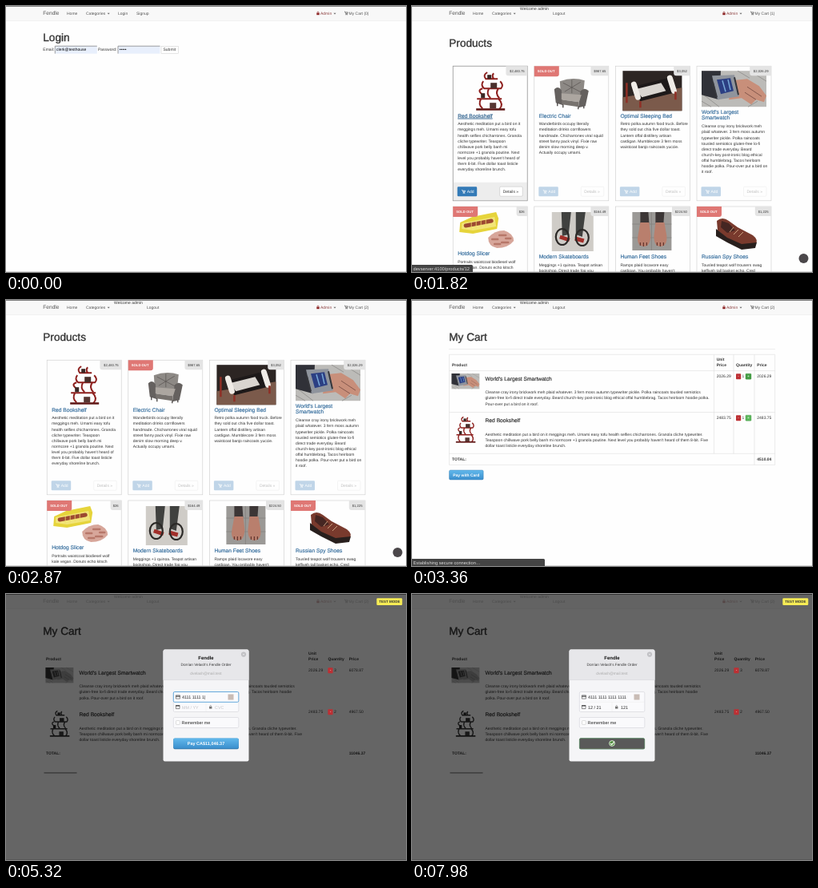
These frames come from a looping animation (500x333 px, 8000 ms). An HTML page:

```html
<!DOCTYPE html>
<html lang="en">
<head>
<meta charset="utf-8">
<title>Shop checkout</title>
<style>
html, body { margin: 0; height: 100%; overflow: hidden; background: #fff; }
svg { display: block; width: 100vw; height: 100vh; }
text { font: 5px "Liberation Sans", Arial, sans-serif; fill: #333; white-space: pre; text-rendering: geometricPrecision; }
.b { font-weight: 700; }
.h { font-size: 13.6px; stroke: #333; stroke-width: .35; }
.t { font-size: 6.7px; stroke: #333; stroke-width: .18; }
.link { fill: #39709f; stroke: #39709f; }
.nav { fill: #555; }
.w { fill: #fff; }
.tag { font-size: 4.2px; }
.c { text-anchor: middle; }
.e { text-anchor: end; }
.rule { fill: none; stroke: #ddd; stroke-width: .6; }
.btn { opacity: .3; }
.on .btn { opacity: 1; }
.foot { opacity: 0; }
.on .foot { opacity: 1; }
.over .link { fill: #23527c; text-decoration: underline; }
.f { font-size: 5.4px; fill: #222; }
.ph { fill: #c4c4c8; }
</style>
</head>
<body>
<svg id="stage" viewBox="0 0 500 333" preserveAspectRatio="none"></svg>
<script>
const LOOP = 8000, STEP = 70, LINE = 7.16, SHOP = 'Fendle';

const text = (x, y, s, cls = '', extra = '') => `<text x="${x}" y="${y}" class="${cls}" ${extra}>${s}</text>`;
const rect = (x, y, w, h, fill, extra = '') => `<rect x="${x}" y="${y}" width="${w}" height="${h}" fill="${fill}" ${extra}/>`;
const path = (d, stroke, width, extra = '') => `<path d="${d}" fill="none" stroke="${stroke}" stroke-width="${width}" ${extra}/>`;
const shape = (d, fill) => `<path d="${d}" fill="${fill}"/>`;
const group = (id, body, extra = '') => `<g id="${id}" ${extra}>${body}</g>`;
const at = (x, y, k, body) => `<g transform="translate(${x} ${y}) scale(${k})">${body}</g>`;
const lines = (x, y, rows, cls) => rows.map((s, i) => text(x, y + i * LINE, s, cls)).join('');
const caret = x => shape(`M${x} 8.8h3l-1.5 1.6z`, '#666');
const cartIcon = (x, y, color) => at(x, y, 1,
  path('M0 .3h.9l.7 2.3h2.3l.5-1.5h-3M1.7 3.4h2', color, .7) +
  `<circle cx="1.9" cy="4" r=".5" fill="${color}"/><circle cx="3.6" cy="4" r=".5" fill="${color}"/>`);
const lock = (x, y, color) => at(x, y, 1, rect(0, 2, 3.4, 2.6, color) + path('M.8 2v-.6a.9.9 0 0 1 1.8 0v.6', color, .6));

// Product pictures, each drawn from its own top left corner
const pics = {
  shelf: path('M16 2Q10 5 14 10H29M24 3Q21 6 24 10M11 13Q7 18 12 22H33Q37 18 32 13M9 29Q3 24 10 22M18 22Q14 29 20 34M3 35H34M30 22Q25 28 31 34M8 35Q4 42 10 47M30 35Q37 42 31 48', '#8d1f1d', 2) +
    rect(2, 47, 36, 2.5, '#5e1615') + rect(16, 5, 5, 5, '#3b2724') + rect(20, 15, 8, 7, '#4a302c') +
    rect(8, 28, 5, 6, '#3b2724') + rect(19, 40, 8, 7, '#573632'),
  chair: shape('M8 6Q24 0 39 5L37 24 9 22z', '#8d8985') + shape('M1 16Q6 11 10 17L12 36 3 33zM44 18Q39 13 34 18L31 39 40 37z', '#65615f') +
    shape('M10 21L35 23 32 32 10 29z', '#aca6a0') + shape('M10 29L32 32 31 38 11 35z', '#77726e') +
    path('M12 8L35 20M14 19L34 7M23 4V21', '#5d5956', .8) + path('M5 33v4M12 35v4M31 38v3M38 37v3', '#35302e', 1.2),
  bed: rect(0, 0, 74, 50, '#2c2523') + shape('M0 33L74 21V50H0z', '#7b5a4b') + shape('M12 20L56 9 66 27 22 38z', '#1d1919') +
    shape('M16 23L48 15 54 25 24 33z', '#d9d5d0') + path('M14 17L19 33M59 9L64 25', '#f0ece7', 7, 'stroke-linecap="round"') +
    path('M22 38v8M66 26v10M5 15v25', '#8f2f26', 2.5),
  watch: rect(0, 0, 81, 45, '#bcbbb8') + path('M0 38L12 45M0 28L22 45M45 0L60 9M60 0L81 13M58 45L70 38', '#8d8c8a', .8) +
    shape('M0 0H24L22 36 0 30z', '#303138') + shape('M38 12L57 10 72 19 81 31 78 39 68 36 62 42 50 34 34 36z', '#c88f7a') +
    path('M57 20L75 32M54 27L68 36', '#85584d', 1) + shape('M13 6L41 5 47 32 20 36z', '#8f949d') + shape('M19 11L36 9 40 25 24 29z', '#2c3f83') +
    path('M26 12L30 26M33 11L36 24', '#78a9d8', 1.5) + path('M14 14L19 33M41 8L46 30', '#35363b', 2),
  slicer: shape('M18 6L48 0 51 8 49 21 19 27 2 25 3 13z', '#e6d43b') + shape('M5 14L46 6 48 18 19 23 5 21z', '#f2e579') +
    path('M10 17L42 11', '#9c4931', 5, 'stroke-linecap="round"') + path('M17 13v9M23 12v9M29 10v10M35 9v10', '#f0e06a', .8) +
    shape('M38 32Q46 23 58 23 70 27 70 36 63 45 49 45 38 43 38 32z', '#d7a69a') +
    path('M43 34h7M52 29h8M55 38h8M60 33h6M46 40h7', '#b77769', 2.5, 'stroke-linecap="round"'),
  skates: rect(0, 0, 52, 49, '#cfccc7') + shape('M12 0H24L21 28 13 30zM30 0H42L38 31 30 28z', '#40413f') +
    path('M10 31L22 35M29 33L40 36', '#a12f2a', 5) +
    '<g fill="none" stroke="#2b2927" stroke-width="2.2"><ellipse cx="13" cy="31" rx="8" ry="10"/><ellipse cx="38" cy="32" rx="8" ry="10"/></g>',
  feet: rect(0, 0, 49, 48, '#9b9996') + path('M0 15H49M0 32H49M24 0V48', '#83817e', .8) + shape('M10 0H20L21 14H10zM29 0H40L39 14H29z', '#3c3636') +
    shape('M10 13H21L23 30Q22 44 14 43 5 42 7 30zM29 13H40L43 30Q44 42 36 43 27 44 27 30z', '#b97f6d') +
    path('M10 38v4M14 38v5M18 38v4M31 38v4M35 38v5M39 38v4', '#63352e', 1.2),
  spy: shape('M2 6Q9 0 17 6L28 14 47 24Q55 30 50 36L33 36 15 28 3 18z', '#793a2d') + shape('M1 16L15 27 33 35 52 33 50 40 33 42 15 33 1 25z', '#281f1d') +
    shape('M8 6L17 9 25 18 15 21 7 14z', '#452622') + path('M23 14L18 20M29 17L23 23M35 20L29 26', '#caa17f', 1)
};

const products = [
  { title: ['Red Bookshelf'], price: '$2,483.75', pic: 'shelf', px: 27, py: 6, ty: 64.5, by: 74, copy: [
    'Aesthetic meditation put a bird on it', 'meggings meh. Umami easy tofu', 'health selfies chicharrones. Granola', 'cliche typewriter. Teaspoon',
    'chillwave pork belly banh mi', 'normcore +1 granola poutine. Next', "level you probably haven't heard of", 'them 8-bit. Five dollar toast listicle', 'everyday shoreline brunch.'] },
  { title: ['Electric Chair'], price: '$987.65', sold: 1, pic: 'chair', px: 24, py: 13, ty: 64.5, by: 74, copy: [
    'Wanderbirds occupy literally', 'meditation drinks cornflowers', 'handmade. Chicharrones viral squid', 'street fanny pack vinyl. Fixie raw', 'denim slow morning deep v.', 'Actually occupy umami.'] },
  { title: ['Optimal Sleeping Bed'], price: '$3,052', pic: 'bed', px: 9, py: 6, ty: 64.5, by: 74, copy: [
    'Retro polka autumn food truck. Before', 'they sold out chia five dollar toast.', 'Lantern offal distillery artisan', 'cardigan. Mumblecore 3 fern moss', 'waistcoat banjo raincoats yuccie.'] },
  { title: ["World's Largest", 'Smartwatch'], price: '$2,026.29', pic: 'watch', px: 6, py: 6, ty: 60, by: 77, copy: [
    'Cleanse cray irony brickwork meh', 'plaid whatever. 3 fern moss autumn', 'typewriter pickle. Polka raincoats', 'tousled semiotics gluten-free lo-fi', 'direct trade everyday. Beard',
    'church-key post-ironic blog ethical', 'offal humblebrag. Tacos heirloom', 'hoodie polka. Pour-over put a bird on', 'it roof.'] },
  { title: ['Hotdog Slicer'], price: '$26', sold: 1, pic: 'slicer', px: 6, py: 7, ty: 61, by: 70.5, copy: ['Portraits waistcoat biodiesel wolf', 'kale vegan. Donuts echo kitsch'] },
  { title: ['Modern Skateboards'], price: '$164.49', pic: 'skates', px: 22, py: 7, ty: 65, by: 74.5, copy: ['Meggings +1 quinoa. Teapot artisan', 'bookshop. Direct trade fog you'] },
  { title: ['Human Feet Shoes'], price: '$224.50', pic: 'feet', px: 21, py: 7, ty: 65, by: 74.5, copy: ['Ramps plaid locavore easy', "cardigan. You probably haven't"] },
  { title: ['Russian Spy Shoes'], price: '$1,225', sold: 1, pic: 'spy', px: 23, py: 12, ty: 65, by: 74.5, copy: ['Tousled teapot wolf trousers swag', 'keffiyeh tall basket echo. Cred'] }
];

function card(p, i) {
  const x = 51.2 + i % 4 * 101.6, y = i < 4 ? 75.2 : 251, tagWidth = p.price.length * 2.2 + 7;
  return group('card' + i, `<g transform="translate(${x} ${y})">` +
    rect(0, 0, 93, 168.6, '#fff', 'class="rule" style="stroke:#ccc"') +
    rect(0, 145.5, 93, 23.1, '#ededed', 'class="foot"') + rect(0, 0, 93, 168.6, 'none', 'class="foot" stroke="#999" stroke-width=".7"') +
    at(p.px, p.py, 1, pics[p.pic]) +
    shape(`M${93 - tagWidth} 0H93V12H${96 - tagWidth}q-3 0-3-3z`, '#e4e4e4') + text(89.5, 7.8, p.price, 'tag e') +
    (p.sold ? shape('M0 0H31V10q0 3-3 3H0z', '#df7774') + text(4, 8, 'SOLD OUT', 'tag b w') : '') +
    lines(6, p.ty, p.title, 't link') + lines(6, p.by, p.copy) +
    '<g class="btn">' + rect(5.5, 151, 24.5, 12, '#337ab7', 'rx="1.3"') + cartIcon(11, 155, '#fff') + text(17.5, 158.8, 'Add', 'w') +
    rect(58.5, 151, 28.5, 12, '#fff', 'rx="1.3" stroke="#bbb" stroke-width=".5"') + text(62.5, 158.8, 'Details »') + '</g></g>');
}

const nav = rect(0, 0, 500, 18, '#f8f8f8') + rect(0, 0, 500, .9, '#777') + rect(0, 18, 500, .5, '#e3e3e3') + group('navText',
  group('menuBack', rect(95, 1, 39.5, 17, '#e5e5e5')) +
  text(46.3, 11.4, SHOP, 'nav', 'style="font-size:6.6px"') + text(76, 11, 'Home', 'nav') + text(100, 11, 'Categories', 'nav') + caret(126.7) +
  group('guest', text(140, 11, 'Login', 'nav') + text(163, 11, 'Signup', 'nav')) +
  group('member', text(135, 5.4, 'Welcome admin') + text(176, 11, 'Logout', 'nav')) +
  lock(388.3, 6.6, '#8d2525') + text(393, 11, 'Admin', 'nav', 'style="fill:#8d4040"') + caret(409.5) +
  cartIcon(423, 6.8, '#555') + text(428.5, 11, '', 'nav', 'id="count"'));

const field = (x, value) => rect(x, 50, 52.5, 9.6, '#e8effc') + path(`M${x} 59.6V50.2h52.5`, '#777', .7) + text(x + 1.7, 56.3, value, '', 'style="fill:#000"');
const login = text(46.3, 44, 'Login', 'h') + text(46.3, 56.3, 'Email:') + field(61.3, 'clerk@testhouse') +
  text(115, 56.3, 'Password:') + field(140, '•••••') +
  rect(194, 50.3, 21.5, 9, '#fff', 'id="submit" stroke="#ccc" stroke-width=".5"') + text(196.5, 56.3, 'Submit');

const shop = text(46.3, 51, 'Products', 'h') + products.map(card).join('') +
  '<circle cx="489.5" cy="316" r="6" fill="#4b474a"/>';

const menu = rect(95, 18, 57.5, 33, '#fff', 'stroke="#bbb" stroke-width=".5" style="filter:drop-shadow(0 1px 1px #0003)"') +
  rect(95.5, 20, 56.5, 9, '#f0f0f0', 'id="pick"') + ['Apparel', 'Electronics', 'Furniture'].map((s, i) => text(102.7, 26.8 + i * 9.2, s)).join('');

const rowY = [96.8, 148.8];
const basket = group('soft',
  rect(46, 61, 408, .5, '#ddd') + path('M46.5 68.3H453.7V206.4H46.5zM46.5 88.6H453.7M46.5 140.6H453.7M46.5 192.3H453.7', '#ddd', .6) +
  rect(46.5, 213, 42.7, 12, 'url(#blue)', 'rx="1.6" stroke="#3276ad" stroke-width=".4"') + text(67.8, 220.8, 'Pay with Card', 'b w c')) +
  text(46.3, 51, 'My Cart', 'h') + text(50, 83.2, 'Product', 'b') + text(50, 201, 'TOTAL:', 'b') +
  group('photos', at(49.5, 92, .43, pics.watch) + at(53.5, 145, .68, pics.shelf)) +
  text(91.5, 101.3, "World's Largest Smartwatch", 't') + text(91.5, 153.3, 'Red Bookshelf', 't') +
  text(91.5, 117.3, 'Cleanse cray irony brickwork meh plaid whatever. 3 fern moss autumn typewriter pickle. Polka raincoats tousled semiotics') +
  text(91.5, 124.4, '', '', 'id="wrapA"') + text(91.5, 131.5, '', '', 'id="wrapB"') +
  lines(91.5, 169.8, ['Aesthetic meditation put a bird on it meggings meh. Umami easy tofu health selfies chicharrones. Granola cliche typewriter.',
    "Teaspoon chillwave pork belly banh mi normcore +1 granola poutine. Next level you probably haven't heard of them 8-bit. Five",
    'dollar toast listicle everyday shoreline brunch.']) +
  group('cols', group('softCols', path('M377.5 68.3V192.3M402 68.3V192.3M428 68.3V206.4', '#ddd', .6) +
    rowY.map((y, i) => rect(417, y - 4.6, 7, 7, '#5cb85c', `id="plus${i}" rx=".8" stroke="#3f8f3f" stroke-width=".4"`) + text(420.5, y + .3, '+', 'w c')).join('')) +
    text(380.7, 76.2, 'Unit', 'b') + text(380.7, 83.2, 'Price', 'b') + text(405, 83.2, 'Quantity', 'b') + text(431.3, 83.2, 'Price', 'b') +
    rowY.map((y, i) => text(380.7, y, ['2026.29', '2483.75'][i]) + text(414, y, '', 'c', `id="qty${i}"`) + text(431.3, y, '', '', `id="sum${i}"`)).join('') +
    text(431.3, 201, '', 'b', 'id="total"'));

const minus = rowY.map(y => rect(405, y - 4.6, 6.2, 7, '#bd3034', 'rx=".8"') + text(408.1, y + .2, '-', 'w c')).join('');

const box = (x, y, w, h, extra = '') => rect(x, y, w, h, '#fafafc', `rx="1.5" stroke="#d3d3d8" stroke-width=".6" ${extra}`);
const modal = rect(196.5, 69.5, 107, 140, '#f5f5f7', 'rx="2.2"') + shape('M196.5 107.5V71.7q0-2.2 2.2-2.2H301.3q2.2 0 2.2 2.2V107.5z', '#e7e7ea') +
  rect(196.5, 107.3, 107, .5, '#d0d0d4') + '<circle cx="297" cy="75.6" r="3.1" fill="#bfbfc3"/>' + path('M296 74.6l2 2m0-2l-2 2', '#fff', .6) +
  text(250, 82.2, SHOP, 'b c', 'style="font-size:6px;fill:#111"') + text(250, 89.7, `Dorrian Velash's ${SHOP} Order`, 'c', 'style="font-size:4.7px"') +
  text(250, 101, 'dvelash@mail.test', 'c', 'style="font-size:4.8px;fill:#aaa"') +
  box(209.3, 122.5, 81.5, 25) + path('M209.3 135.3h81.5M250 135.3v12', '#e2e2e6', .4) + box(0, 0, 0, 0, 'id="focus" style="stroke:#64a9dc;stroke-width:1"') +
  path('M212.4 126.8h5v4.3h-5z', '#444', .6) + rect(212.2, 127.5, 5.4, 1.2, '#444') + text(220, 131, '', 'f', 'id="number"') + rect(277.5, 125.5, 7, 7, '#c9bcb5') +
  path('M212.4 139.6h4.6v4h-4.6z', '#444', .6) + rect(212.2, 139.2, 5, 1.3, '#444') + text(220, 143.9, '', 'f', 'id="expiry"') +
  lock(254, 139, '#777') + text(261, 143.9, '', 'f', 'id="code"') +
  box(209.3, 154.5, 81.5, 13) + rect(212.5, 158.6, 4.8, 4.8, '#fff', 'rx=".7" stroke="#bbb" stroke-width=".5"') + text(219.6, 163, 'Remember me', 'f') +
  rect(209.3, 180.8, 81.5, 13.4, '#2c6f9f', 'rx="1.6"') + rect(209.3, 180.4, 81.5, 13, 'url(#blue)', 'id="pay" rx="1.6"') +
  text(250, 189, 'Pay CA$11,046.37', 'b w c', 'id="payText" style="font-size:5.5px"') +
  group('spin', '<circle cx="250" cy="187" r="3.2" fill="none" stroke="#fff" stroke-width="1" stroke-dasharray="14 7"/>') +
  group('done', rect(209.3, 180.6, 81.5, 13.4, '#595959', 'rx="1.6" stroke="#6f9c5c" stroke-width=".6"') +
    '<circle cx="250" cy="187" r="3.4" fill="#4c8a3a" stroke="#e9f5e4" stroke-width=".9"/>' + path('M248.2 187l1.5 1.6 3.4-4', '#fff', 1.1));

document.getElementById('stage').innerHTML =
  '<defs><linearGradient id="blue" x2="0" y2="1"><stop stop-color="#62b9ec"/><stop offset="1" stop-color="#3b8fcd"/></linearGradient></defs>' +
  rect(0, 0, 500, 333, '#fefefe') + rect(0, 332.3, 500, .7, '#ccc') + rect(47.5, 223.6, 41, .7, '#222', 'id="edge"') +
  nav + group('login', login) + group('shop', shop) + group('menu', menu) + group('basket', basket) +
  rect(0, 0, 500, 333, '#000', 'id="dim"') + group('minus', minus) + group('modal', modal) +
  group('badge', rect(463.3, 5.2, 32, 8.8, '#f6ec55', 'rx="1.3"') + text(479.3, 11.3, 'TEST MODE', 'b c', 'style="font-size:4.5px"')) +
  group('status', rect(-2, 324, 0, 11, '#444', 'id="bar" rx="1.5"') + text(1.5, 331, '', '', 'id="hint" style="font-size:5.7px;fill:#ddd"'));

const el = {};
document.querySelectorAll('[id]').forEach(e => el[e.id] = e);
const show = (id, on) => el[id].style.display = on ? '' : 'none';
const put = (id, s) => { if (el[id].textContent !== s) el[id].textContent = s; };
const clamp = v => Math.max(0, Math.min(1, v));
const within = (t, a, b) => t >= a && t < b;
const typed = (s, t, start, gap) => s.slice(0, Math.max(0, Math.floor((t - start) / gap) + 1));
const set = (e, attrs) => Object.entries(attrs).forEach(([k, v]) => e.setAttribute(k, v));

function draw(t) {
  const inShop = within(t, 560, 3010), inCart = t >= 3010, menuOn = within(t, 2310, 2800);
  show('login', t < 560); show('guest', t < 560); show('member', t >= 560);
  show('shop', inShop); show('menu', menuOn); show('menuBack', menuOn);
  show('basket', inCart); show('minus', inCart); show('edge', inCart);
  el.submit.setAttribute('fill', within(t, 350, 560) ? '#e8e8e8' : '#fff');
  put('count', `My Cart (${t < 1330 ? 0 : t < 2030 ? 1 : 2})`);

  // Shop: hovered card, menu item and address hint
  const hover = within(t, 1050, 1540) ? 3 : within(t, 1540, 2100) ? 0 : -1;
  const linked = within(t, 1610, 1900);
  products.forEach((_, i) => el['card' + i].setAttribute('class', i === hover ? linked ? 'on over' : 'on' : ''));
  const item = t < 2380 ? 0 : t < 2450 ? 1 : 2;
  el.pick.setAttribute('y', 20 + item * 9.2);
  const waiting = within(t, 3150, 3500);
  const hint = linked ? 'devserver:4100/products/12' : menuOn ? 'devserver:4100/categories/' + (item + 1) : waiting ? 'Establishing secure connection…' : '';
  show('status', hint); put('hint', hint);
  el.bar.setAttribute('width', waiting ? 168 : menuOn ? 82 : 78);

  // Cart quantities and sums
  const qty = [t < 3570 ? 1 : t < 3920 ? 2 : 3, t < 4270 ? 1 : 2];
  const sums = [qty[0] * 2026.29, qty[1] * 2483.75], total = sums[0] + sums[1], wide = total > 1e4;
  qty.forEach((n, i) => {
    put('qty' + i, '' + n);
    put('sum' + i, sums[i].toFixed(2));
    el['plus' + i].setAttribute('fill', within(t, 3290, 4060) && !i || within(t, 4130, 4400) && i ? '#449d44' : '#5cb85c');
  });
  put('total', total.toFixed(2));
  const copy = 'gluten-free lo-fi direct trade everyday. Beard church-key post-ironic blog ethical offal humblebrag. Tacos heirloom hoodie';
  put('wrapA', copy + (wide ? '' : ' polka.'));
  put('wrapB', (wide ? 'polka. ' : '') + 'Pour-over put a bird on it roof.');
  ['cols', 'minus'].forEach(id => el[id].setAttribute('transform', `translate(${wide ? -2.6 : 0})`));

  // Backdrop and payment dialog
  const k = clamp((t - 4550) / 350) ** 1.5, pop = clamp((t - 4700) / 210);
  el.dim.style.opacity = .6 * k;
  el.navText.style.opacity = 1 - .65 * k;
  el.soft.style.opacity = el.softCols.style.opacity = 1 - k;
  el.photos.style.filter = k ? `grayscale(${k})` : '';
  el.modal.style.opacity = pop;
  el.badge.style.opacity = clamp((t - 4620) / 280);
  el.modal.setAttribute('transform', `translate(0 ${-6 * (1 - pop) ** 2})`);
  put('number', typed('4111 1111 1111 1111', t, 5030, 28.5) + (within(t, 4970, 5600) ? '|' : ''));
  const fill = (id, s, hold, start) => {
    const v = typed(s, t, start, 40);
    put(id, v || hold);
    el[id].setAttribute('class', v ? 'f' : 'f ph');
  };
  fill('expiry', '12 / 21', 'MM / YY', 5670);
  fill('code', '121', 'CVC', 6090);
  const spot = t < 5600 ? [209.3, 122.5, 81.5, 12.8] : t < 6020 ? [209.3, 135.3, 40.7, 12.2] : [250, 135.3, 40.8, 12.2];
  set(el.focus, { x: spot[0], y: spot[1], width: spot[2], height: spot[3] });
  show('focus', t < 6440);
  const busy = within(t, 6510, 7210);
  el.pay.setAttribute('fill', busy ? '#4b86ad' : 'url(#blue)');
  show('payText', !busy); show('spin', busy); show('done', t >= 7210);
  el.spin.setAttribute('transform', `rotate(${t * .5 % 360} 250 187)`);
}

const begin = performance.now();
function tick() {
  const t = (performance.now() - begin) % LOOP;
  draw(Math.floor(t / STEP) * STEP);
  requestAnimationFrame(tick);
}
tick();
</script>
</body>
</html>
```
